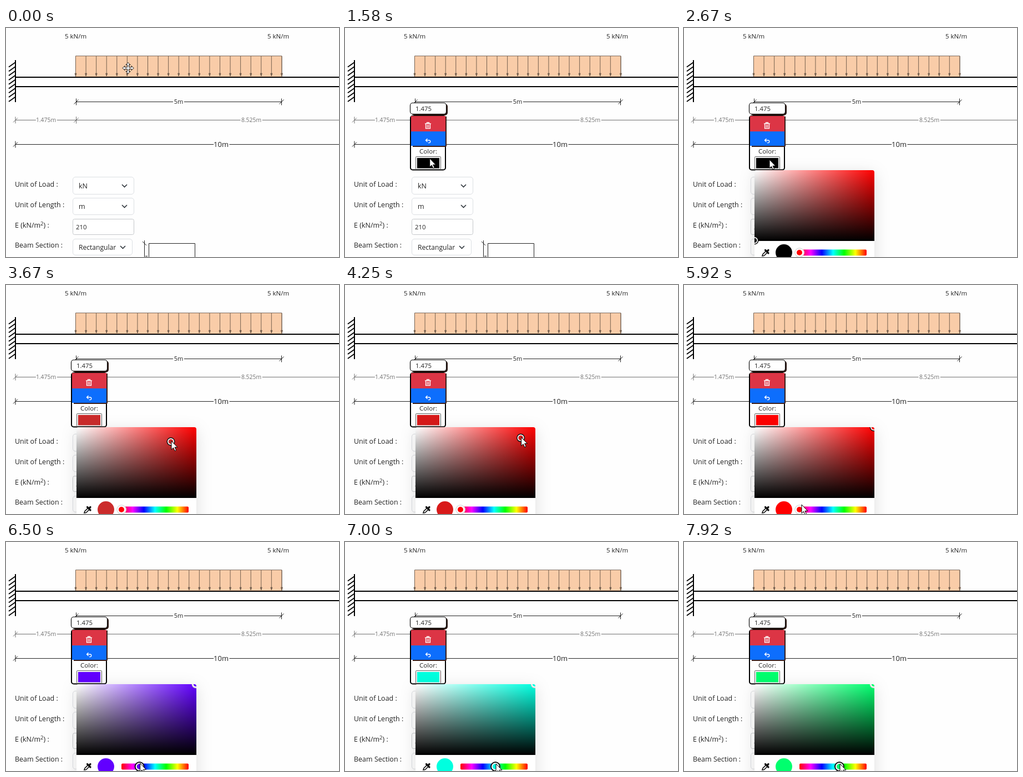
An HTML page for the animation above (8 s loop, 600x414 px).

```html
<!DOCTYPE html>
<html lang="en">
<head>
<meta charset="utf-8">
<title>Beam load editor</title>
<style>
  html, body { margin: 0; width: 100%; height: 100%; overflow: hidden; background: #fefefe; }
  svg { display: block; width: 100%; height: 100%; }
  text { font: 12.5px 'Open Sans', 'Noto Sans', sans-serif; fill: #222; }
  .field { fill: #fff; stroke: #dcdfe3; }
  .line { fill: none; stroke: #222; }
  .icon { fill: none; stroke: #fff; stroke-width: 1.3; }
  .shadow { filter: drop-shadow(0 6px 14px rgba(0, 0, 0, .13)); }
</style>
</head>
<body>
<svg viewBox="0 0 600 414">
  <defs>
    <linearGradient id="sat"><stop stop-color="#fff"/><stop id="satEnd" offset="1" stop-color="red"/></linearGradient>
    <linearGradient id="val" x2="0" y2="1"><stop stop-opacity="0"/><stop offset="1"/></linearGradient>
    <linearGradient id="hues"></linearGradient>
    <clipPath id="frame"><path d="M127 420V261a4 4 0 0 1 4-4H339a4 4 0 0 1 4 4V420z"/></clipPath>
  </defs>

  <g id="beam">
    <path d="M17 89H601M17 106H601M17 58V134" class="line" style="stroke:#000;stroke-width:2"/>
    <path id="hatch" class="line" style="stroke:#000;stroke-width:1.8"/>
    <path d="M125.5 88V50.5H497V88" fill="#f9cca8" stroke="#7d6c60"/>
    <path id="arrows" stroke="#75604f" fill="#75604f"/>
    <text x="106" y="19" style="font-size:11.5px">5 kN/m</text>
    <text x="471" y="19" style="font-size:11.5px">5 kN/m</text>
    <g id="dims"></g>
  </g>

  <g id="form">
    <text x="16" y="287">Unit of Load :</text>
    <text x="16" y="324">Unit of Length :</text>
    <text x="16" y="361">E (kN/m<tspan dy="-4" style="font-size:9.5px">2</tspan><tspan dy="4">) :</tspan></text>
    <text x="16" y="397">Beam Section :</text>
    <rect class="field" x="120.5" y="269.5" width="110" height="31" rx="4.5"/>
    <rect class="field" x="120.5" y="307.5" width="110" height="30" rx="4.5"/>
    <rect class="field" x="120.5" y="345.5" width="110" height="28" rx="3" style="stroke:#c4c7ca"/>
    <rect class="field" x="120.5" y="381.5" width="107" height="29" rx="4.5"/>
    <text x="131" y="290">kN</text>
    <text x="131" y="327">m</text>
    <text x="126" y="364" style="font-size:11.3px">210</text>
    <text x="131" y="401" style="font-size:12.1px">Rectangular</text>
    <path class="line" style="stroke:#343a40;stroke-width:1.7" d="M209 283l4.5 4.5 4.5-4.5M209 320l4.5 4.5 4.5-4.5M206 394l4.5 4.5 4.5-4.5"/>
    <path class="line" d="M257.5 415V389.5H340.5V415M249.5 384V415M246 386l7 7M251 412.5h4"/>
  </g>

  <g id="popup">
    <rect x="120" y="137" width="65" height="21" rx="5" fill="#2b1712"/>
    <rect x="117.5" y="135.5" width="65" height="20" rx="4.5" fill="#fff" stroke="#111" stroke-width="1.2"/>
    <text x="127" y="150" style="font-size:11.4px">1.475</text>
    <rect x="118" y="159" width="63" height="97.5" rx="4" fill="#fff" stroke="#000" stroke-width="2"/>
    <rect x="119" y="159" width="62" height="28" fill="#dc3545"/>
    <rect x="119" y="187" width="62" height="26" fill="#0d6efd"/>
    <path d="M122 214H182M182 160V214" class="line" style="stroke:#3a1d1a;stroke-width:2"/>
    <path class="icon" d="M144 173h11M147.500 172.500v-1.500h4v1.500M145.500 174v7.500h8V174M148.200 175v5M150.800 175v5"/>
    <path class="icon" d="M148.500 200l-3 3 3 3M145.500 203h6a2.300 2.300 0 0 1 0 4.600h-1.500"/>
    <text x="134" y="227" style="font-size:11.600px">Color:</text>
    <rect x="127.500" y="232.500" width="45" height="23" rx="1" fill="#f2f2f2" stroke="#666"/>
    <rect x="130" y="235" width="40" height="18.500" class="chosen"/>
  </g>

  <g id="picker">
    <g class="shadow"><rect x="127" y="257" width="216" height="180" rx="4" fill="#fff"/></g>
    <g clip-path="url(#frame)">
      <rect x="127" y="257" width="216" height="128" fill="url(#sat)"/>
      <rect x="127" y="257" width="216" height="128" fill="url(#val)"/>
      <g id="handle">
        <circle class="ring" r="7.500"/><circle r="6" fill="#fff"/><circle r="4.300" class="chosen"/>
      </g>
    </g>
    <path d="M141 412l1-3 6-6 2.500 2.500-6 6z" fill="#fff" stroke="#111" stroke-width="1.600"/>
    <path d="M146.500 401.500l5.500 5.500M149.500 404l2.500-2.500" stroke="#111" stroke-width="3.200" stroke-linecap="round"/>
    <circle cx="180" cy="406" r="15" class="chosen"/>
    <rect x="208" y="400.500" width="121" height="11" rx="2" fill="url(#hues)"/>
    <g id="thumb">
      <circle class="ring" r="9"/><circle r="7" fill="#fff"/><circle r="5" class="pure"/>
    </g>
  </g>

  <g id="cursor" fill="#fff" stroke="#000">
    <path id="pointer" d="M0 0V15.500l3.500-3.300 2.600 5.600 2.500-1.100-2.600-5.400h4.800z"/>
    <path id="mover" d="M0-10 4-6 1.500-6 1.500-1.500 6-1.500 6-4 10 0 6 4 6 1.500 1.500 1.500 1.500 6 4 6 0 10-4 6-1.500 6-1.500 1.500-6 1.500-6 4-10 0-6-4-6-1.500-1.500-1.500-1.500-6-4-6z"/>
  </g>
</svg>
<script>
const LOOP = 8000;
const POPUP = 880, PICKER = 1830, PICK = 3250, RELEASE = 5400, HUE = 6080;
const $ = id => document.getElementById(id);
const clamp = (v, lo, hi) => Math.min(hi, Math.max(lo, v));
const range = (n, f) => Array.from({ length: n }, (_, i) => f(i)).join('');

$('hatch').setAttribute('d', range(9, i => `M17 ${62 + i * 7.8}l-12 8.5`));
$('arrows').setAttribute('d', range(21, i => `M${125.5 + i * 18.57} 51v36l-1.5-5h3l-1.5 5`));
$('hues').innerHTML = range(7, i => `<stop offset="${i / 6}" stop-color="hsl(${360 - i * 60},100%,50%)"/>`);

function dim(x1, x2, y, label, mid, size, color) {
  const tick = x => `M${x} ${y - 6}v12M${x - 4} ${y + 4}l8-8`;
  return `<path class="line" style="stroke:${color}" d="M${x1} ${y}H${x2}${tick(x1)}${tick(x2)}"/>
    <text x="${mid}" y="${y + size * .36}" text-anchor="middle" paint-order="stroke" stroke="#fefefe"
      stroke-width="5" style="font-size:${size}px;fill:${color}">${label}</text>`;
}
$('dims').innerHTML =
  dim(126.5, 496.5, 133.5, '5m', 311, 11, '#222') +
  dim(126.5, 620, 166.5, '8.525m', 442, 10.4, '#707070') +
  dim(17, 126.5, 166.5, '1.475m', 72, 10.4, '#707070') +
  dim(17, 620, 210.5, '10m', 387.5, 13, '#222');

// Pointer path: time, x, y
const path = [
  [0, 220, 72.5], [80, 220, 72.5], [800, 108, 162], [960, 108, 162], [1650, 154, 238],
  [2800, 154, 238], [3250, 284, 293], [3650, 298, 282], [3920, 298, 282],
  [4750, 354, 263], [4950, 354, 263], [5250, 352, 252], [5400, 352, 252],
  [5900, 212, 397], [6080, 211, 399], [6920, 272, 401], [7200, 272, 401],
  [7920, 281, 401], [8000, 282, 401]
];

function cursorAt(t) {
  const i = Math.max(1, path.findIndex(p => p[0] > t));
  const [t0, x0, y0] = path[i - 1], [t1, x1, y1] = path[i];
  const k = (t - t0) / (t1 - t0), e = k * k * (3 - 2 * k);
  return [x0 + (x1 - x0) * e, y0 + (y1 - y0) * e];
}

function hsv(h, s, v) {
  const l = v * (1 - s / 2), m = Math.min(l, 1 - l);
  return `hsl(${h},${m ? (v - l) / m * 100 : 0}%,${l * 100}%)`;
}

const show = (id, on) => $(id).setAttribute('display', on ? 'inline' : 'none');
const move = (id, x, y) => $(id).setAttribute('transform', `translate(${x} ${y})`);
const paint = (sel, color) => document.querySelectorAll(sel).forEach(el => el.setAttribute('fill', color));

function draw(now) {
  const t = now % LOOP;
  const [x, y] = cursorAt(t);
  const [px, py] = cursorAt(Math.min(t, RELEASE));
  const hx = t < PICK ? 127 : clamp(px - 1, 127, 342);
  const hy = t < PICK ? 384 : clamp(py + 1, 257, 385);
  const tx = t < HUE ? 208 : clamp(x - 1, 208, 329);
  const hue = 360 * (1 - (tx - 208) / 121);
  const pure = `hsl(${hue},100%,50%)`;
  const color = t < PICK ? '#000' : hsv(hue, (hx - 127) / 215, 1 - (hy - 257) / 128);

  show('popup', t >= POPUP);
  show('picker', t >= PICKER);
  move('handle', hx, hy);
  move('thumb', tx, 406);
  paint('.chosen', color);
  paint('.pure', pure);
  paint('#handle .ring', t < HUE ? '#111' : '#ccc');
  paint('#thumb .ring', t < HUE ? '#e4e4e4' : '#111');
  $('satEnd').setAttribute('stop-color', pure);

  const onLoad = y > 50 && y < 88;
  show('mover', onLoad);
  show('pointer', !onLoad);
  move('cursor', x, y);
  requestAnimationFrame(draw);
}
requestAnimationFrame(draw);
</script>
</body>
</html>
```
